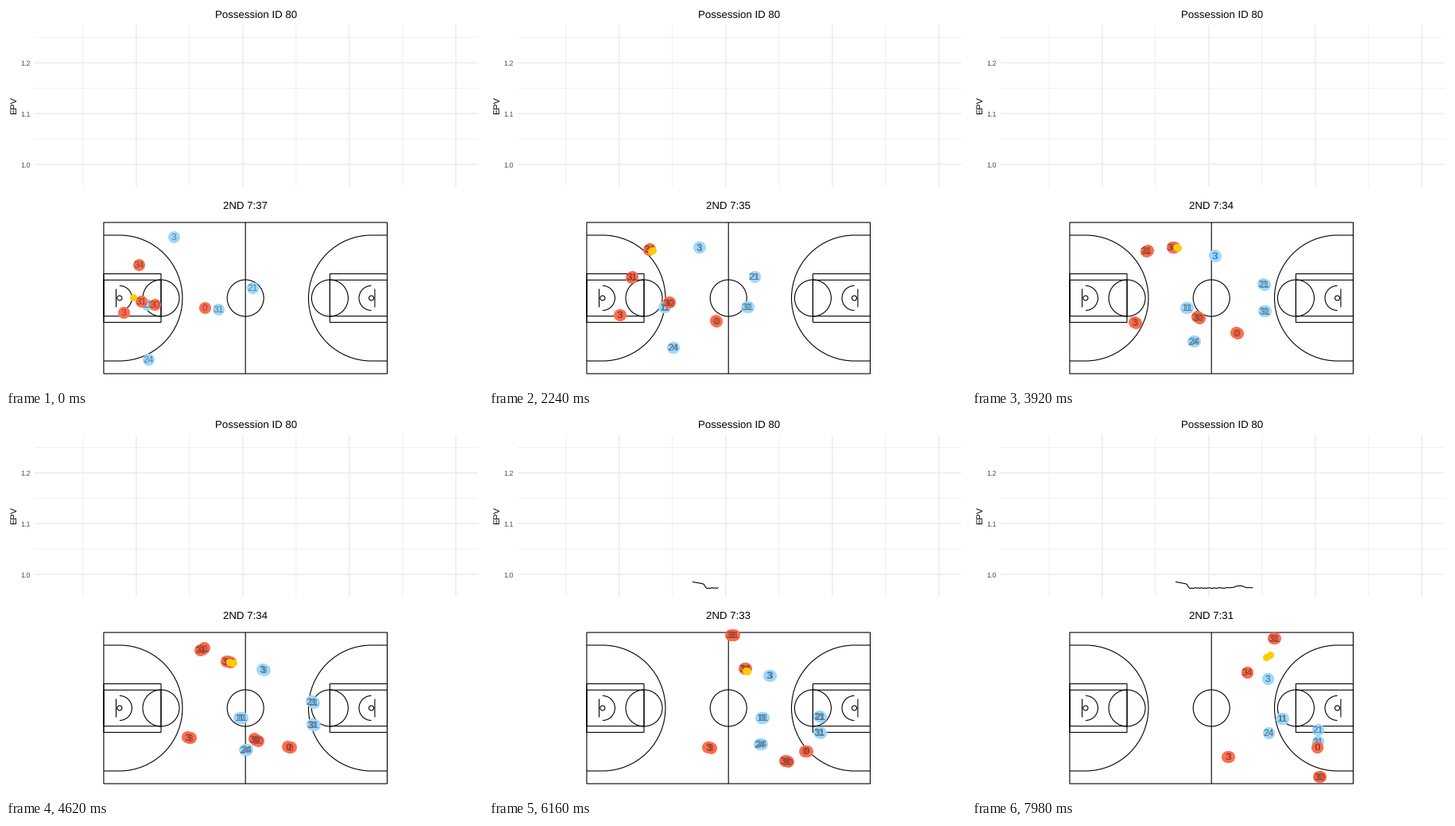
A matplotlib script that plays this animation: 600x480 px, repeating every 8000 ms.

```python
import numpy as np
import matplotlib.pyplot as plt
from matplotlib.animation import FuncAnimation
from matplotlib.patches import Arc, Circle, Rectangle

W, H, DPI = 600, 480, 100
PX = 72 / DPI
FRAMES, INTERVAL, STEP = 200, 40, 140

plt.rcParams.update({"font.family": "Liberation Sans", "text.hinting": "none"})
fig = plt.figure(figsize=(W / DPI, H / DPI), dpi=DPI, facecolor="white")
ax = fig.add_axes([0, 0, 1, 1])
ax.set(xlim=(0, W), ylim=(H, 0))
ax.axis("off")


def line(x, y, color="black", width=1.1, z=1):
    return ax.plot(x, y, color=color, lw=width * PX, zorder=z,
                   solid_capstyle="butt", snap=False)[0]


def label(x, y, s, size, ha="center", **kw):
    return ax.text(x, y, s, fontsize=size * PX, ha=ha, **kw)


# EPV panel: every second grid line is a major one
for k in range(8):
    x, width = 96.9 + 67 * k, 1.4 if k % 2 else 0.7
    line([x, x], [24, 227], "#ebebeb", width, 0)
for k in range(6):
    y, width = 39.5 + 31.9 * k, 1.4 if k % 2 else 0.7
    line([36, 594], [y, y], "#ebebeb", width, 0)
    if k % 2:
        label(31, y + 3.6, f"{1.25 - 0.05 * k:.1f}", 9, "right", color="#4d4d4d")
label(315, 15, "Possession ID 80", 13.2)
label(13.5, 124.7, "EPV", 11, rotation=90, rotation_mode="anchor")
clock = label(301, 255, "", 13.2)

# Court, measured from its centre
CX, CY = 301.2, 367
HALF_W, HALF_H = 178.3, 95
HOOP, ARC, LANE, RING = 158.3, 79, 106.2, 23


def outline(shape):
    shape.set(fill=False, ec="black", lw=1.1 * PX, zorder=1, snap=False)
    ax.add_patch(shape)


def circle(x, r):
    outline(Circle((x, CY), r))


def half_court(side):
    def at(d):
        return CX + side * d

    for h in (30.5, 22.7):
        outline(Rectangle((at(HALF_W), CY - h), side * (LANE - HALF_W), 2 * h))
    circle(at(LANE), RING)
    circle(at(HOOP), 3)
    line([at(162.7)] * 2, [CY - 11.5, CY + 11.5])
    for r in (15.5, ARC):
        start = 90 * side
        outline(Arc((at(HOOP), CY), 2 * r, 2 * r, theta1=start, theta2=start + 180))
    for y in (CY - ARC, CY + ARC):
        line([at(HALF_W), at(HOOP)], [y, y])


outline(Rectangle((CX - HALF_W, CY - HALF_H), 2 * HALF_W, 2 * HALF_H))
line([CX, CX], [CY - HALF_H, CY + HALF_H])
circle(CX, RING)
half_court(-1)
half_court(1)

# Players run smoothly through four points, reached at these tracking ticks
KNOTS = np.array([0, 57, 96.5, 141.5])
TICKS = np.arange(143)


def run(points, from_rest):
    p = np.array(points, float)
    m = np.gradient(p, KNOTS, axis=0, edge_order=2)
    if from_rest:
        m[0] = 0
    i = np.clip(np.searchsorted(KNOTS, TICKS, side="right") - 1, 0, len(KNOTS) - 2)
    h = (KNOTS[i + 1] - KNOTS[i])[:, None]
    u = (TICKS - KNOTS[i])[:, None] / h
    ease = u * u * (3 - 2 * u)
    return (p[i] + ease * (p[i + 1] - p[i])
            + h * u * (1 - u) * ((1 - u) * m[i] - u * m[i + 1]))


def dots(size, color, z):
    return ax.scatter([], [], s=(size * PX) ** 2, c=color, linewidths=0, zorder=z)


class Team:
    def __init__(self, color, ink, z, from_rest, paths):
        self.tracks = {n: run(p, from_rest) for n, p in paths.items()}
        self.dots = dots(15, color, z)
        self.tags = {n: [label(0, 0, str(n), 12, color=ink, zorder=z + 1)
                         for _ in range(3)] for n in paths}

    def show(self, ticks):
        self.dots.set_offsets(np.vstack([t[ticks] for t in self.tracks.values()]))
        for n, tags in self.tags.items():
            spots = self.tracks[n][ticks]
            for k, tag in enumerate(tags):
                tag.set_visible(k < len(spots))
                if k < len(spots):
                    tag.set_position(spots[k] + (0, 4.2))


blue = Team("#9fd8ff", "#587d97", 3, False, {
    3: [(211, 290), (288, 309), (341, 323), (372, 330)],
    11: [(177, 375), (247, 379), (323, 379), (390, 380)],
    31: [(267, 381), (350, 380), (404, 393), (435, 409)],
    21: [(310, 354), (351, 343), (404, 370), (435, 394)],
    24: [(179, 444), (258, 424), (325, 416), (373, 398)],
})
red = Team("#ff6e50", "#8f4030", 5, True, {
    34: [(167, 325), (229, 300), (306, 314), (346, 322)],
    31: [(170, 371), (198, 321), (279, 280), (380, 279)],
    30: [(187, 375), (258, 379), (348, 423), (437, 453)],
    3: [(148, 385), (184, 392), (257, 411), (322, 428)],
    0: [(250, 379), (312, 405), (381, 420), (434, 416)],
})

# The ball is passed to 34, dribbled, then passed on
moments = [0, 24, 57, 135, 142]
ball_track = red.tracks[34] + np.column_stack([
    np.interp(TICKS, moments, [-7.5, 1, 6, 0, 28.5]),
    np.interp(TICKS, moments, [40.5, 4, 0, 5, -22.5])])
ball = dots(9, "#ffcc00", 7)

# EPV: a drop, then a nearly flat stretch with slight jitter
EPV_START, EPV_SPEED, EPV_TICK = 256, 2.03, 93.5
epv_x = np.arange(EPV_START, 357, EPV_SPEED)
epv_y = np.interp(epv_x, [256, 270, 273, 325, 338, 345],
                  [208.4, 211, 216.2, 215.8, 213, 215.7])
flat = (epv_x > 273) & (epv_x < 338)
epv_y[flat] += np.random.default_rng(4).uniform(-0.6, 0.6, flat.sum())
epv = line([], [], z=2)


def last_tick(step):
    return int(np.floor(2.49 * step + 0.85))


def draw(i):
    step = (i * INTERVAL + INTERVAL // 2) // STEP
    end = last_tick(step)
    ticks = np.arange(max(0, last_tick(step - 1) + 1), end + 1)
    blue.show(ticks)
    red.show(ticks)
    ball.set_offsets(ball_track[ticks])
    clock.set_text(f"2ND 7:{36 - (step - 5) // 10}")
    shown = epv_x <= EPV_START + EPV_SPEED * (end - EPV_TICK)
    epv.set_data(epv_x[shown], epv_y[shown])
    return ()


anim = FuncAnimation(fig, draw, frames=FRAMES, interval=INTERVAL,
                     repeat=True, repeat_delay=0, blit=False)
plt.show()
```
